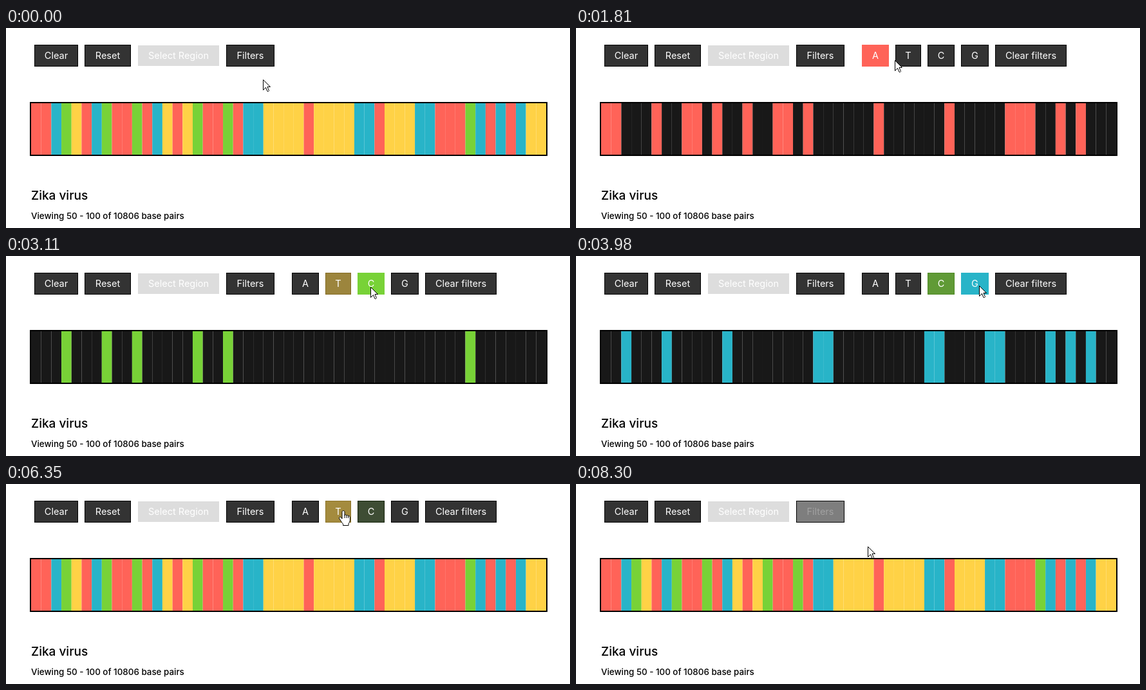
Recreate the animation shown at these times as an HTML page. Size 876 px wide and 311 px high, loop 8350 ms.

```html
<!DOCTYPE html>
<html lang="en">
<head>
<meta charset="utf-8">
<title>Base pair filters</title>
<style>
  html, body { margin: 0; width: 100%; height: 100%; overflow: hidden; background: #fff; }
  svg { display: block; font-family: Inter, sans-serif; cursor: default; }
  .label { font-size: 14.5px; text-anchor: middle; }
  .info { font-weight: 500; }
</style>
</head>
<body>
<svg width="876" height="311" viewBox="0 0 876 311">
  <g id="buttons"></g>
  <g id="filters"></g>
  <g id="strip"></g>
  <rect x="38" y="116" width="802" height="82" fill="none" stroke="#000" stroke-width="2"/>
  <text class="info" x="39" y="267" font-size="19">Zika virus</text>
  <text class="info" x="39" y="297" font-size="13.4">Viewing 50 - 100 of 10806 base pairs</text>
  <g id="pointer" fill="#fff" stroke="#000" stroke-linejoin="round">
    <path id="arrow" d="M.5 .5V16.5L4.5 12.5L7 18.5H8.5L9.5 17.5L7 11.5H11.5Z"/>
    <g id="hand" transform="translate(-7 0)">
      <path d="M5 13V2.6C5 -.1 9 -.1 9 2.6V7.6C9.4 6.4 11.8 6.6 12 8.2C12.6 7.2 14.6 7.4 14.8 9
               C15.6 8.4 17.4 8.8 17.4 10.6V15C17.4 18 15.4 19.4 15 21V23.5H6.6V21.4
               C5.2 19.4 3.8 18.2 3 16.2C2.2 14.4 .5 13.4 .5 11.8C.6 10.2 2.6 9.8 3.6 11Z"/>
      <path d="M9 7V12M12 8V12M14.8 9V12" fill="none"/>
    </g>
  </g>
</svg>
<script>
const LOOP = 8350, FADE = 160, LAG = 105;
const OPEN = 560, CLOSE = 7230, SHOW = 300;
const BASES = 'AAGCTAGCAACAGTATCAACAGGTTTTATTTTGGATTTGGAAACGAGAGTT';
const COLORS = { A: [255, 99, 88], T: [255, 210, 70], C: [120, 210, 55], G: [40, 180, 200] };
const BLACK = [0, 0, 0], WHITE = [255, 255, 255], DARK = [51, 51, 51];

// button widths, laid out from left to right
const WIDTHS = {
  buttons: { Clear: 68, Reset: 72, 'Select Region': 128, Filters: 75 },
  filters: { A: 42, T: 40, C: 42, G: 43, 'Clear filters': 111 }
};
// pointer moves: start, end, and where to
const HOME = [399, 80];
const MOVES = [
  [40, 410, 385, 44], [740, 1130, 466, 51], [1650, 1920, 514, 50],
  [2480, 2780, 566, 48], [3200, 3420, 626, 46], [4490, 4750, 697, 46],
  [5610, 6943, 385, 37], [8070, 8238, 412, 60], [8238, 8300, 453, 97]
];
const CLICKS = { 1400: 'A', 2170: 'T', 2960: 'C', 3845: 'G', 5100: '' };

const $ = id => document.getElementById(id);
const clamp = v => Math.max(0, Math.min(1, v));
const ease = p => 1 - (1 - clamp(p)) ** 2;
const lerp = (a, b, k) => a.map((v, i) => v + (b[i] - v) * k);
const rgb = color => `rgb(${color.map(Math.round)})`;

function add(parent, tag, attrs, text = '') {
  const el = document.createElementNS('http://www.w3.org/2000/svg', tag);
  for (const key in attrs) el.setAttribute(key, attrs[key]);
  el.textContent = text;
  return parent.appendChild(el);
}

const pointerAt = t => MOVES.reduce(
  (pos, [start, end, ...goal]) => lerp(pos, goal, clamp((t - start) / (end - start))), HOME);

function pickAt(t) {
  const last = Object.keys(CLICKS).filter(time => time <= t).pop();
  return last ? CLICKS[last] : '';
}

const inside = (b, [x, y]) => x >= b.left && x < b.right && y >= 26 && y < 60;

const buttons = [];
let left = 44;
for (const group in WIDTHS) {
  for (const [label, width] of Object.entries(WIDTHS[group])) {
    const box = add($(group), 'rect',
      { x: left + .5, y: 26.5, width: width - 1, height: 33, fill: '#ddd', stroke: '#fff' });
    const text = add($(group), 'text',
      { class: 'label', x: left + width / 2, y: 48.2, fill: '#fff' }, label);
    if (label !== 'Select Region') {
      buttons.push({ label, left, right: left + width, box, text, tint: COLORS[label], turns: [] });
    }
    left += width + 10;
  }
  left += 17;
}

const cell = 800 / BASES.length;
const cells = [...BASES].map((base, i) =>
  add($('strip'), 'rect', { x: 39 + i * cell, y: 117, width: cell, height: 80 }));

// find when each button lights up and goes dark again
for (const b of buttons) {
  let lit = false;
  for (let t = 0; t < LOOP; t += 2) {
    const now = inside(b, pointerAt(t)) || pickAt(t - LAG) === b.label;
    if (now !== lit) b.turns.push([t, now ? 1 : 0]);
    lit = now;
  }
}

function levelAt(b, t) {
  let from = 0, to = 0, start = -FADE;
  const level = time => from + (to - from) * ease((time - start) / FADE);
  for (const [time, target] of b.turns) {
    if (time > t) break;
    [from, to, start] = [level(time), target, time];
  }
  return level(t);
}

function draw(t) {
  for (const b of buttons) {
    const k = levelAt(b, t);
    b.box.setAttribute('fill', rgb(lerp(DARK, b.tint || WHITE, k)));
    b.box.setAttribute('stroke', rgb(lerp(BLACK, b.tint || BLACK, k)));
    b.text.setAttribute('fill', rgb(lerp(WHITE, b.tint ? WHITE : BLACK, k)));
  }
  $('filters').setAttribute('opacity', clamp((t - OPEN) / SHOW) - clamp((t - CLOSE) / SHOW));

  const pick = pickAt(t);
  cells.forEach((c, i) => {
    const on = !pick || pick === BASES[i];
    c.setAttribute('fill', on ? rgb(COLORS[BASES[i]]) : '#181818');
  });

  const pos = pointerAt(t), chosen = pickAt(t - LAG);
  const hand = buttons.some(b => inside(b, pos) && b.label !== chosen);
  $('pointer').setAttribute('transform', `translate(${pos.map(Math.round)})`);
  $('hand').setAttribute('visibility', hand ? 'visible' : 'hidden');
  $('arrow').setAttribute('visibility', hand ? 'hidden' : 'visible');
}

const begin = performance.now();
function tick() {
  draw((performance.now() - begin) % LOOP);
  requestAnimationFrame(tick);
}
tick();
</script>
</body>
</html>
```
